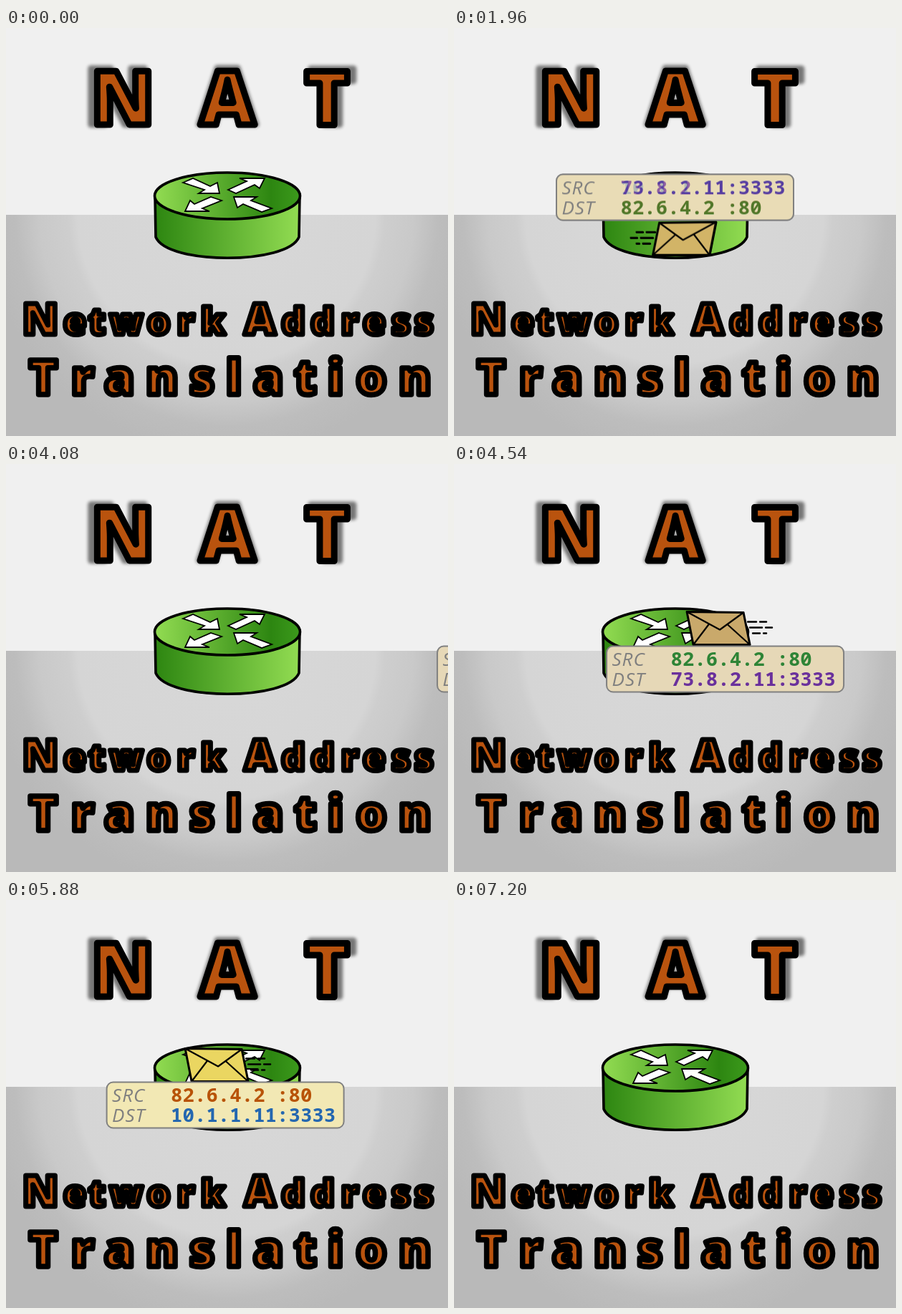
An HTML page that plays this animation: 617x570 px, repeating every 7260 ms.

```html
<!DOCTYPE html>
<html lang="en">
<head>
<meta charset="utf-8">
<title>NAT</title>
<style>
  html, body { margin: 0; width: 100%; height: 100%; overflow: hidden; background: #f0f0f0; }
  svg { display: block; width: 617px; height: 570px; }
  .title { font-family: "Open Sans", "Noto Sans", sans-serif; font-weight: 800; text-anchor: middle;
           fill: #b9530e; stroke: #000; stroke-linejoin: round; }
  .label { font: italic 26px "Open Sans", "Noto Sans", sans-serif; letter-spacing: 1px; fill: #7f7f7f; }
  .addr { font: bold 27.4px "Noto Sans Mono", "DejaVu Sans Mono", monospace; white-space: pre; }
  .ink { stroke: #000; stroke-linejoin: round; stroke-linecap: round; }
</style>
</head>
<body>
<svg viewBox="0 0 617 570" xmlns="http://www.w3.org/2000/svg">
  <defs>
    <radialGradient id="floor" gradientUnits="userSpaceOnUse" cx="308" cy="261" r="335">
      <stop offset="0" stop-color="#d8d8d8"/>
      <stop offset=".62" stop-color="#d5d5d5"/>
      <stop offset=".66" stop-color="#cecece"/>
      <stop offset=".78" stop-color="#c9c9c9"/>
      <stop offset=".88" stop-color="#bdbdbd"/>
      <stop offset="1" stop-color="#b9b9b9"/>
    </radialGradient>
    <linearGradient id="side">
      <stop offset="0" stop-color="#2d8611"/>
      <stop offset="1" stop-color="#92dc52"/>
    </linearGradient>
    <linearGradient id="lid">
      <stop offset="0" stop-color="#92dc52"/>
      <stop offset=".8" stop-color="#2d8611"/>
      <stop offset="1" stop-color="#3c9a1c"/>
    </linearGradient>
    <filter id="soft" x="-10%" y="-20%" width="120%" height="140%">
      <feGaussianBlur stdDeviation="1.8"/>
    </filter>
    <g id="nat">
      <text x="163 309 448" y="134.5" font-size="105">NAT</text>
    </g>
  </defs>

  <rect width="617" height="570" fill="#f0f0f0"/>
  <rect y="261" width="617" height="309" fill="url(#floor)"/>

  <g class="title">
    <use href="#nat" transform="translate(303.5 96) scale(1.05 1.05) translate(-303.5 -97)" filter="url(#soft)"
         opacity=".5" style="fill:#000" stroke-width="8"/>
    <use href="#nat" stroke-width="9"/>
    <g stroke-width="7">
      <text x="48" y="427.5" font-size="60">N</text>
      <text x="96 127 168 213 251 289" y="427.5" font-size="51">etwork</text>
      <text x="354.5" y="427.5" font-size="60">A</text>
      <text x="401 442 480 514 551 583" y="427.5" font-size="51">ddress</text>
    </g>
    <text x="52 107 158 218 273 318 366 418 460 510 571" y="512" font-size="67" stroke-width="7.5">Translation</text>
  </g>

  <g class="ink">
    <path d="M208 234L209 292C225 331 393 331 409 292L410 234Z" fill="url(#side)" stroke-width="3.6"/>
    <ellipse cx="309" cy="234.5" rx="101.5" ry="32.5" fill="url(#lid)" stroke-width="3.6"/>
    <g fill="#fff" stroke-width="1.8" stroke-linejoin="miter">
      <path d="M247 216L261 210L285 221L295 216L298 231L269 231L277 226Z"/>
      <path d="M310 226L336 214L326 210L361 210L354 224L347 219L321 231Z"/>
      <path d="M286 236L301 241L274 252L284 256L250 256L257 241L263 246Z"/>
      <path d="M318 236L350 236L342 241L371 252L357 257L331 246L323 251Z"/>
    </g>
  </g>

  <g id="out"></g>
  <g id="back"></g>
</svg>
<script>
const LOOP = 7260, REST = 142, LEFT = -335, RIGHT = 618;
const INSIDE = { card: "#f2e8b4", mail: "#ead661", local: "#2467b0", remote: "#b85308" };
const OUTSIDE = { card: "#e6d8b7", mail: "#c9a96b", local: "#6a309c", remote: "#2e8436" };

// Envelope with its speed lines, 90 x 48; flipped when it flies left
function envelope(x, y, fill, flip) {
  const turn = flip ? "translate(90 0) scale(-1 1)" : "";
  return `<g class="ink" transform="translate(${x} ${y}) ${turn}" stroke-width="3">
    <path d="M9 1L88 0L79 46L0 46Z" fill="${fill}"/>
    <path d="M9 1L42 25L88 0M0 46L31 18M79 46L57 17" fill="none" stroke-width="2.2"/>
    <path d="M-23 14H-14M-9 14H3M-31 22H-22M-17 22H0M-23 30H-19M-14 30H-4" fill="none" stroke-width="2.4"/>
  </g>`;
}

function packet(look, local, flip, mailX, mailY) {
  const near = [local + ":3333", look.local], far = ["82.6.4.2 :80", look.remote];
  const rows = flip ? [far, near] : [near, far];
  const lines = rows.map(([text, color], i) => {
    const y = 28.5 + i * 28;
    return `<text class="label" x="8.5" y="${y}">${i ? "DST" : "SRC"}</text>
      <text class="addr" x="90.5" y="${y}" fill="${color}">${text}</text>`;
  }).join("");
  return `<g>${envelope(mailX, mailY, look.mail, flip)}
    <rect x="1" y="1" width="331" height="64" rx="9" fill="${look.card}" stroke="#808080" stroke-width="2"/>
    ${lines}</g>`;
}

const trips = [
  { id: "out", y: 203.5, from: LEFT, to: RIGHT, start: 465, leave: 2210,
    layers: packet(INSIDE, "10.1.1.11", false, 136, 68) + packet(OUTSIDE, "73.8.2.11", false, 135.5, 67.5) },
  { id: "back", y: 253.5, from: RIGHT, to: LEFT, start: 4069, leave: 5810,
    layers: packet(OUTSIDE, "73.8.2.11", true, 111, -47) + packet(INSIDE, "10.1.1.11", true, 108.5, -46) }
];
for (const trip of trips) {
  trip.node = document.getElementById(trip.id);
  trip.node.innerHTML = trip.layers;
}

const ramp = (t, start, length) => Math.min(1, Math.max(0, (t - start) / length));

function draw(now) {
  const t = now % LOOP;
  for (const { node, y, from, to, start, leave } of trips) {
    const enter = 1 - (1 - ramp(t, start, 1000)) ** 3;
    const exit = ramp(t, leave, 1000) ** 2;
    const x = from + (REST - from) * enter + (to - REST) * exit;
    node.setAttribute("transform", `translate(${x.toFixed(2)} ${y})`);
    // The translated packet fades in over the arriving one
    const swap = ramp(t, start + 1000, 670);
    node.children[1].setAttribute("opacity", swap);
    node.children[0].setAttribute("opacity", swap < 1 ? 1 : 0);
  }
}

const begin = performance.now();
function tick() {
  draw(performance.now() - begin);
  requestAnimationFrame(tick);
}
tick();
</script>
</body>
</html>
```
